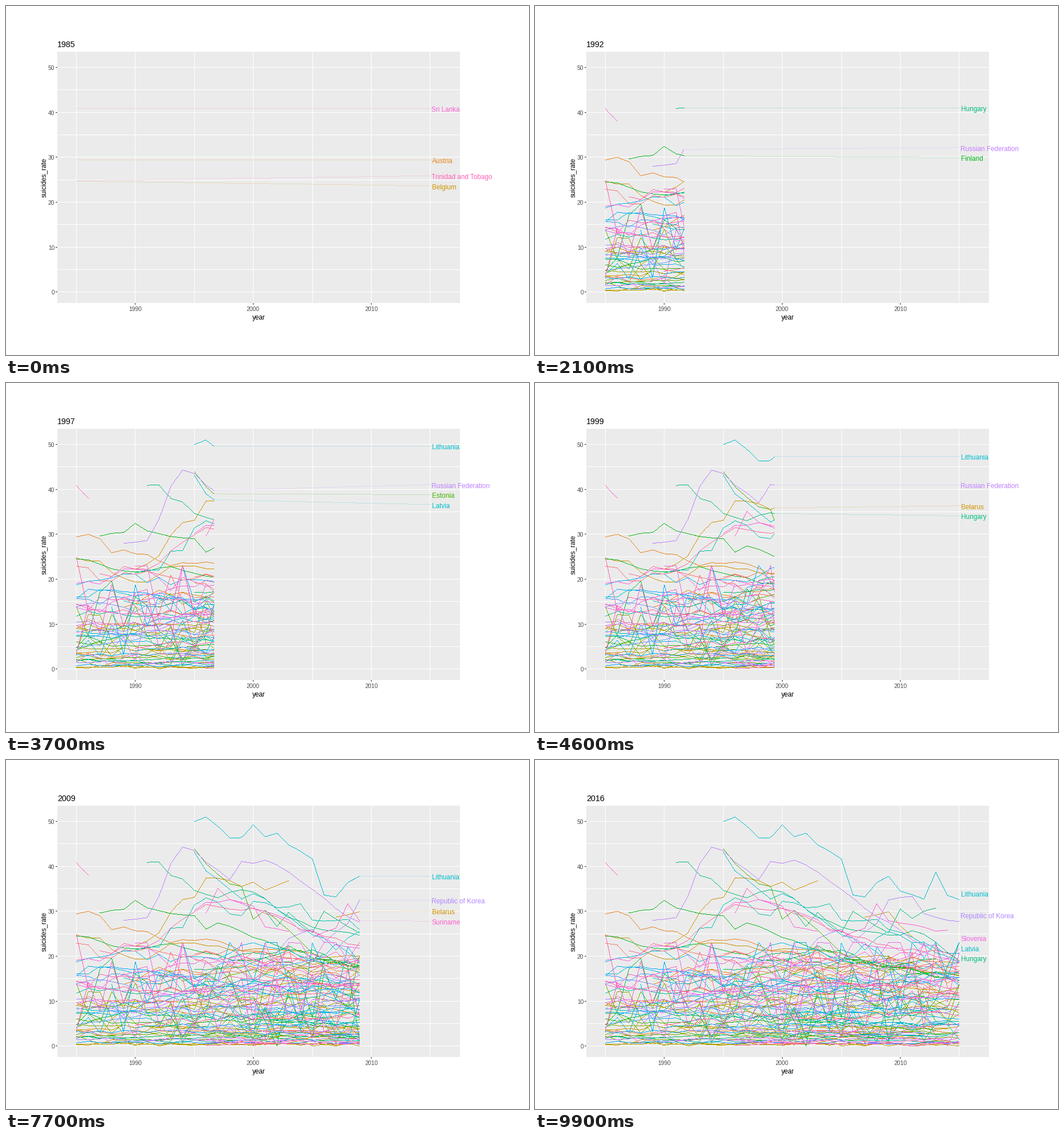
These frames come from a looping animation (917x611 px, 10000 ms). A matplotlib script:

```python
import matplotlib.pyplot as plt
import numpy as np
from matplotlib.animation import FuncAnimation
from matplotlib.patches import Rectangle

W, H, DPI = 917, 611, 100
FRAMES, INTERVAL = 100, 100
FIRST, LAST, SPAN = 1985, 2015, 31
COUNT = 101
PX = 72 / DPI
YEARS = np.arange(FIRST, LAST + 1)
# Whole years fall on whole frames; the motion between them is linear.
KEYS = np.round(np.arange(SPAN + 1) * (FRAMES - 1) / SPAN)

plt.rcParams["font.family"] = "Liberation Sans"
rng = np.random.default_rng(12)


def px(year):
    return 123.4 + (year - FIRST) * 20.685


def py(rate):
    return 500.6 - 7.86 * rate


def hue_color(i):
    """Evenly spaced HCL hue with chroma 100 and luminance 65."""
    h, lum = np.radians(15 + 360 * i / COUNT), 65
    u = 100 * np.cos(h) / (13 * lum) + 0.1978
    v = 100 * np.sin(h) / (13 * lum) + 0.4683
    y = ((lum + 16) / 116) ** 3
    x = 2.25 * y * u / v
    z = 3 * y / v - 5 * y - x / 3
    m = np.array([[3.2405, -1.5371, -0.4985],
                  [-0.9693, 1.8760, 0.0416],
                  [0.0556, -0.2040, 1.0572]])
    rgb = np.clip(m @ [x, y, z], 0, 1)
    return np.where(rgb > 0.0031308, 1.055 * rgb ** (1 / 2.4) - 0.055, 12.92 * rgb)


COLORS = [hue_color(i) for i in range(COUNT)]
names, shown, rates = {}, {}, {}


def trace(i, name, *points, show=(FIRST, LAST)):
    """Series through (year, rate) points with a slight wobble in between."""
    row = rates.setdefault(i, np.full(len(YEARS), np.nan))
    years, values = zip(*points)
    span = np.arange(years[0], years[-1] + 1)
    wobble = np.where(np.isin(span, years), 0, rng.normal(0, 0.4, len(span)))
    row[span - FIRST] = np.interp(span, years, values) + wobble
    names[i], shown[i] = name, show


trace(87, "Sri Lanka", (1985, 40.9), (1986, 38))
trace(92, "Trinidad and Tobago", (1985, 24.8), (1986, 13), (1987, 16), (2015, 13))
trace(6, "Austria", (1985, 29.4), (1986, 30), (1987, 29), (1988, 25.9), (1989, 26.5),
      (1993, 23), (1996, 23.8), (2005, 18.2), (2015, 15.6))
trace(12, "Belgium", (1985, 24.7), (1987, 24), (1988, 21.5), (1991, 19.4), (1993, 22.8),
      (2005, 20.6), (2015, 18.4))
trace(33, "France", (1985, 24.5), (1986, 24.3), (1988, 22.3), (1990, 21.6), (1993, 22.8),
      (1998, 19.2), (2010, 17.7), (2015, 14.6))
trace(32, "Finland", (1987, 29.6), (1988, 30.2), (1989, 30.4), (1990, 32.4), (1993, 29.5),
      (1995, 29), (1996, 26), (1997, 27.4), (2002, 22.3), (2015, 14.1), show=(FIRST, 1993))
trace(75, "Russian Federation", (1989, 28), (1991, 28.6), (1992, 33.3), (1993, 40.6),
      (1994, 44.3), (1995, 43.5), (1998, 37), (1999, 41.1), (2001, 41.4), (2002, 40.3),
      (2007, 30.6), (2015, 18.5))
trace(40, "Hungary", (1991, 40.9), (1992, 41), (1993, 38), (1994, 37.2), (1995, 34.6),
      (1997, 33), (1999, 34.8), (2000, 34.3), (2003, 28.6), (2006, 25.8), (2012, 24.9),
      (2015, 19))
trace(11, "Belarus", (1990, 22.2), (1992, 25.2), (1993, 29.8), (1994, 32.6), (1995, 33.1),
      (1996, 37.4), (1998, 36.8), (1999, 35.5), (2000, 36.5), (2001, 34.7), (2003, 36.8),
      show=(1995, LAST))
trace(11, "Belarus", (2007, 28.7), (2009, 29.9), (2011, 24.3), show=(1995, LAST))
trace(95, "Ukraine", (1987, 21.2), (1988, 20.6), (1989, 22.8), (1991, 22.2), (1996, 31.5),
      (1999, 30.2), (2000, 30.7), (2008, 22.7), (2014, 20.7), (2015, 18.9))
trace(52, "Lithuania", (1995, 50), (1996, 51), (1998, 46.3), (1999, 46.4), (2000, 49.2),
      (2001, 46.6), (2002, 47.4), (2003, 44.8), (2005, 41.6), (2006, 33.6), (2007, 33.2),
      (2008, 36.4), (2009, 37.8), (2010, 34.5), (2012, 32.7), (2013, 38.7), (2014, 33.5),
      (2015, 32.6))
trace(30, "Estonia", (1995, 43.9), (1996, 40.6), (1998, 36.1), (1999, 35.5), (2000, 28.2),
      (2001, 30.2), (2006, 19), (2015, 15.7))
trace(51, "Latvia", (1995, 43.1), (1996, 39), (1999, 32.7), (2000, 33.9), (2007, 21.4),
      (2009, 25.5), (2015, 20.6))
trace(47, "Kazakhstan", (1990, 21.4), (1992, 22), (1993, 26.2), (1994, 26.4), (1995, 31.4),
      (1996, 33), (1999, 29), (2000, 32.2), (2002, 30.8), (2004, 31.7), (2005, 28),
      (2008, 28.2), (2015, 18.7))
trace(84, "Slovenia", (1995, 30.2), (1996, 32), (1998, 32.6), (2001, 30), (2005, 25.5),
      (2007, 22.5), (2014, 19.4), (2015, 21.6))
trace(88, "Suriname", (1996, 29.6), (1997, 35.1), (1998, 32.6), (2000, 31.2), (2001, 26.5),
      (2003, 25.5))
trace(88, "Suriname", (2005, 24.2), (2007, 26.2), (2008, 31.7), (2009, 27.9), (2014, 25.8))
trace(39, "Guyana", (2001, 30), (2002, 26.6), (2003, 29.8), (2005, 25.2), (2006, 30),
      (2009, 25.2), (2010, 30.5), (2011, 28.4), (2013, 30.7))
trace(73, "Republic of Korea", (1985, 10.4), (1989, 8.3), (1997, 14), (1998, 19.5),
      (2000, 14.5), (2003, 23.9), (2005, 26), (2006, 23.1), (2008, 27.3), (2009, 32.5),
      (2011, 33.3), (2012, 29.5), (2015, 27.7))


def background_series(level):
    """Slow drift around a level; a few small populations swing wildly."""
    n = len(YEARS)
    drift = np.cumsum(rng.normal(0, 0.04, n))
    row = level * (1 + drift - drift.mean()) + rng.normal(0, 0.2 + 0.03 * level, n)
    if rng.random() < 0.14:
        row += rng.normal(0, 0.45 * level, n)
    if rng.random() < 0.48:
        row[:rng.integers(1, 16)] = np.nan
    if rng.random() < 0.25:
        row[-rng.integers(1, 4):] = np.nan
    return np.clip(row, 0, 23)


others = [i for i in range(COUNT) if i not in rates]
levels = 0.3 + 20 * np.linspace(0, 1, len(others)) ** 1.3
for i, level in zip(others, rng.permutation(levels)):
    rates[i] = background_series(level)


def stroke(x0, y0, x1, y1):
    """Pixels of a crisp one-pixel line, with the fraction travelled at each."""
    s = np.linspace(0, 1, int(max(abs(x1 - x0), abs(y1 - y0))) + 2)
    return (x0 + (x1 - x0) * s).astype(int), (y0 + (y1 - y0) * s).astype(int), s


trail = []
for i in sorted(rates):
    row = rates[i]
    for k in range(len(row) - 1):
        if not np.isnan(row[k] + row[k + 1]):
            x, y, s = stroke(px(YEARS[k]), py(row[k]), px(YEARS[k + 1]), py(row[k + 1]))
            trail.append((x, y, k + s, np.full(len(s), i)))
trail_x, trail_y, trail_t, trail_i = map(np.concatenate, zip(*trail))
trail_rgba = np.c_[np.array(COLORS)[trail_i], np.ones(len(trail_i))]

fig = plt.figure(figsize=(W / DPI, H / DPI), dpi=DPI, facecolor="white")
ax = fig.add_axes([0, 0, 1, 1])
ax.axis("off")
canvas = np.zeros((H, W, 4))
picture = ax.imshow(canvas, extent=(0, W, H, 0), aspect="auto",
                    interpolation="nearest", zorder=2)
ax.set_xlim(0, W)
ax.set_ylim(H, 0)


def text(x, y, s, size, color="black", **kw):
    return ax.text(x, y, s, fontsize=size * PX, color=color, va="baseline", **kw)


def box(x0, y0, x1, y1, color):
    ax.add_patch(Rectangle((x0, y0), x1 - x0, y1 - y0, fc=color, lw=0, antialiased=False))


box(90, 80, 796, 520, "#EBEBEB")
for year in range(1985, 2016, 5):
    x = int(px(year))
    box(x, 80, x + 1, 520, "white")
    if year % 10 == 0:
        box(x, 520, x + 1, 523, "#333333")
        text(x + 0.5, 534, str(year), 10.3, "#4D4D4D", ha="center")
for rate in range(0, 51, 5):
    y = int(py(rate))
    box(90, y, 796, y + 1, "white")
    if rate % 10 == 0:
        box(87, y, 90, y + 1, "#333333")
        text(85.5, y + 4.8, str(rate), 10.3, "#4D4D4D", ha="right")
text(443.3, 549, "year", 11.7, ha="center")
text(70, 300, "suicides_rate", 11.7, ha="center", rotation=90, rotation_mode="anchor")
title = text(90, 71.6, "", 14.3)
tags = [text(746.5, 0, "", 11.7) for _ in range(5)]


def rate_at(row, t):
    k = int(t)
    return row[k] if t == k else row[k] + (row[k + 1] - row[k]) * (t - k)


def spread(ys, gap=17.6):
    """Push sorted label heights apart until none overlap."""
    ys = list(ys)
    for _ in range(80):
        for a in range(len(ys) - 1):
            push = max(0, gap - (ys[a + 1] - ys[a])) / 2
            ys[a] -= push
            ys[a + 1] += push
    return ys


def place_labels(t):
    """Name the highest series and lead a faint line to each name."""
    done = t >= LAST - FIRST
    now = {i: rate_at(rates[i], t) for i in names}
    ranked = sorted((i for i in now if not np.isnan(now[i])), key=lambda i: -now[i])
    top = [i for i in ranked[:5 if done else 4]
           if shown[i][0] <= FIRST + t <= shown[i][1]]
    # Finished lines touch the names, which then sit a little higher.
    heights = spread(py(now[i]) + (-10 if done else 1.5) for i in top)
    for tag in tags:
        tag.set_text("")
    for tag, i, y in zip(tags, top, heights):
        tag.set(text=names[i], color=COLORS[i], y=y + 4.3)
        if not done:
            x, row, _ = stroke(px(FIRST + t), py(now[i]), 745, y - 1.5)
            canvas[row, x] = (*COLORS[i], 0.2)


def draw(frame):
    t = min(np.interp(frame, KEYS, np.arange(SPAN + 1)), LAST - FIRST)
    title.set_text(str(round(FIRST + SPAN * frame / (FRAMES - 1))))
    canvas[:] = 0
    place_labels(t)
    seen = (trail_t <= t) & (t > 0)
    canvas[trail_y[seen], trail_x[seen]] = trail_rgba[seen]
    picture.set_data(canvas)
    return [picture, title, *tags]


anim = FuncAnimation(fig, draw, frames=FRAMES, interval=INTERVAL, repeat=True,
                     repeat_delay=0, blit=False)
plt.show()
```
